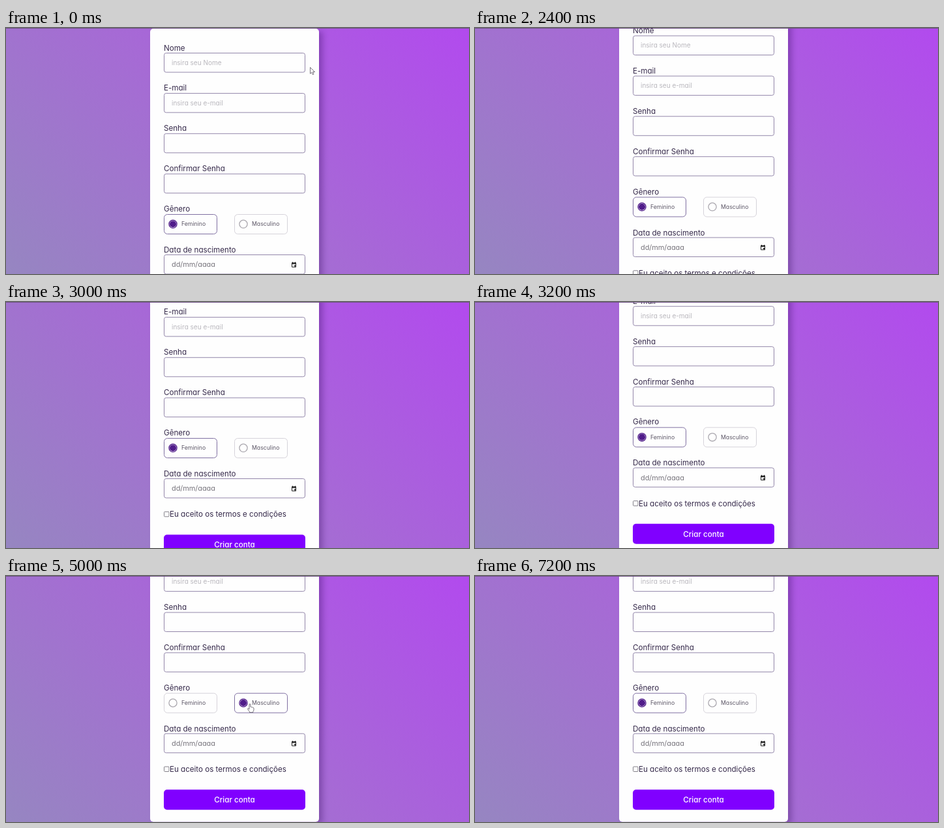
An HTML page that plays this animation: 710x378 px, repeating every 8.4 s.

```html
<!DOCTYPE html>
<html lang="pt">
<head>
<meta charset="utf-8">
<style>
html, body { margin: 0; width: 100%; height: 100%; overflow: hidden; }
body { position: relative; background: linear-gradient(45deg, #9686c1, #a66ad5 50%, #b24aee); }
#card {
  position: absolute; left: 221px; top: 1px; width: 259px; height: 483px;
  background: #fefefe; border-radius: 5px; box-shadow: 6px 4px 9px rgba(40, 0, 80, .28);
}
#bar { position: absolute; top: 0; left: 0; width: 100%; height: 1px; background: #705386; }
svg { position: absolute; left: 0; top: 0; overflow: visible; }
#card svg { left: -221px; top: -1px; }
text { font: 11.6px Inter, sans-serif; font-feature-settings: "cv11"; fill: #35294a; }
.hint { font-size: 10px; fill: #b9b7bd; }
.date { font-size: 10.9px; fill: #77747c; }
.small { font-size: 8.7px; fill: #5c5666; }
.button { font-weight: 500; fill: #fff; text-anchor: middle; }
.field { fill: none; stroke: #9387aa; }
.option rect { fill: none; stroke: #d6d3da; }
.option circle { fill: none; stroke: #aaa7ae; stroke-width: 1.3; }
.option .dot { stroke: none; }
.option.on rect { stroke: #8070a2; }
.option.on circle { stroke: #501c8a; }
.option.on .dot { fill: #501c8a; }
#cursor path { fill: #fff; stroke: #55505c; stroke-width: .8; stroke-linejoin: round; }
</style>
</head>
<body>
<div id="card"><svg id="form" width="710" height="490"></svg></div>
<div id="bar"></div>
<svg width="710" height="378">
  <g id="cursor">
    <path id="arrow" d="M.5 .5V10.2L2.8 8.2L4.3 11.6L6 10.9L4.5 7.5H7.5Z"/>
    <path id="hand" d="M-1 1.2Q0 -.2 1 1.2V5.2Q2 4.5 2.6 5.6Q3.7 5 4.3 6.2Q5.8 5.8 6 7.4V9.6Q5.8 11.6 4.8 12.2V13.6H-.6V12.4L-3.3 8.8Q-3.7 7.4 -2.3 7.5L-1 8.7Z"/>
  </g>
</svg>
<script>
const $ = id => document.getElementById(id);
const text = (x, y, s, cls = "") => `<text x="${x}" y="${y}" class="${cls}">${s}</text>`;
const box = (x, y, w, h, r, cls = "") =>
  `<rect x="${x}" y="${y}" width="${w}" height="${h}" rx="${r}" class="${cls}"/>`;
const field = y => box(242.5, y, 216, 29.5, 3, "field");
const option = (id, x, s) => `<g id="${id}" class="option">${box(x, 286.5, 81, 30, 5)}
  <circle cx="${x + 13.5}" cy="301.3" r="6.1"/><circle class="dot" cx="${x + 13.5}" cy="301.3" r="4.4"/>
  ${text(x + 26.5, 304.4, s, "small")}</g>`;

const inputs = [["Nome", "insira seu Nome"], ["E-mail", "insira seu e-mail"],
  ["Senha", ""], ["Confirmar Senha", ""]];
$("form").innerHTML = inputs.map(([label, hint], i) => {
  const y = i * 61.9;
  return text(242, y + 34.5, label) + field(y + 38.5) + text(254, y + 56.8, hint, "hint");
}).join("") +
  text(242, 282, "Gênero") + option("female", 242.5, "Feminino") + option("male", 350.5, "Masculino") +
  text(242, 345, "Data de nascimento") + field(348.5) + text(254, 367.4, "dd/mm/aaaa", "date") +
  `<path d="M438.5 361.2H444.5V367.3H438.5Z" fill="none" stroke="#222"/>
   <path d="M438 360.5H445V362.8H438ZM439 359.5h1v2h-1ZM443 359.5h1v2h-1ZM442 364.5h2v2h-2Z" fill="#222"/>` +
  `<rect x="242.5" y="399.3" width="7.5" height="7.5" rx="1" fill="#fff" stroke="#77737c" stroke-width=".9"/>` +
  text(251, 407.2, "Eu aceito os termos e condições") +
  `<rect x="242" y="434.5" width="217" height="31" rx="5" fill="#8000ff"/>` +
  text(350.5, 454.2, "Criar conta", "button");

// Keys are [time, value, ...]; values are interpolated linearly.
function sample(keys, t) {
  let i = keys.findIndex(k => k[0] > t);
  if (i < 0) return keys[keys.length - 1].slice(1);
  if (i === 0) return keys[0].slice(1);
  const a = keys[i - 1], b = keys[i], p = (t - a[0]) / (b[0] - a[0]);
  return a.slice(1).map((v, j) => v + (b[j + 1] - v) * p);
}

const scroll = [[1900, 0], [2000, 1], [2100, 6], [2400, 26.5], [3000, 77], [3300, 102], [3400, 106.3]];
const pointer = [[0, 466, 60], [100, 575, 55], [200, 640, 53], [3900, 649, 176], [4100, 540, 262],
  [4400, 363, 333], [4600, 366, 268], [4800, 374, 196], [5200, 374, 196], [5500, 330, 203],
  [5800, 284.5, 195], [6200, 284.5, 195], [6600, 368, 208], [7000, 480, 202]];
const inside = (x, y, l, t, r, b) => x > l && x < r && y > t && y < b;

function draw(now) {
  const t = Math.floor(now % 8400 / 100) * 100;
  const [top] = sample(scroll, t);
  $("card").style.transform = `translateY(${-top}px)`;

  const male = t >= 5000 && t < 6200;
  $("male").classList.toggle("on", male);
  $("female").classList.toggle("on", !male);

  const shown = t < 800 || t >= 3900 && t < 7200;
  const [x, y] = t < 800 ? sample(pointer, Math.min(t, 200)) : sample(pointer, t);
  const link = t >= 3900 && (inside(x, y, 242, 180, 324, 211) ||
    inside(x, y, 350, 180, 432, 211) || inside(x, y, 242, 328, 459, 359));
  $("cursor").setAttribute("transform", `translate(${x} ${y})`);
  $("cursor").style.display = shown ? "" : "none";
  $("arrow").style.display = link ? "none" : "";
  $("hand").style.display = link ? "" : "none";
}

const start = performance.now();
function tick() {
  draw(performance.now() - start);
  requestAnimationFrame(tick);
}
tick();
</script>
</body>
</html>
```
